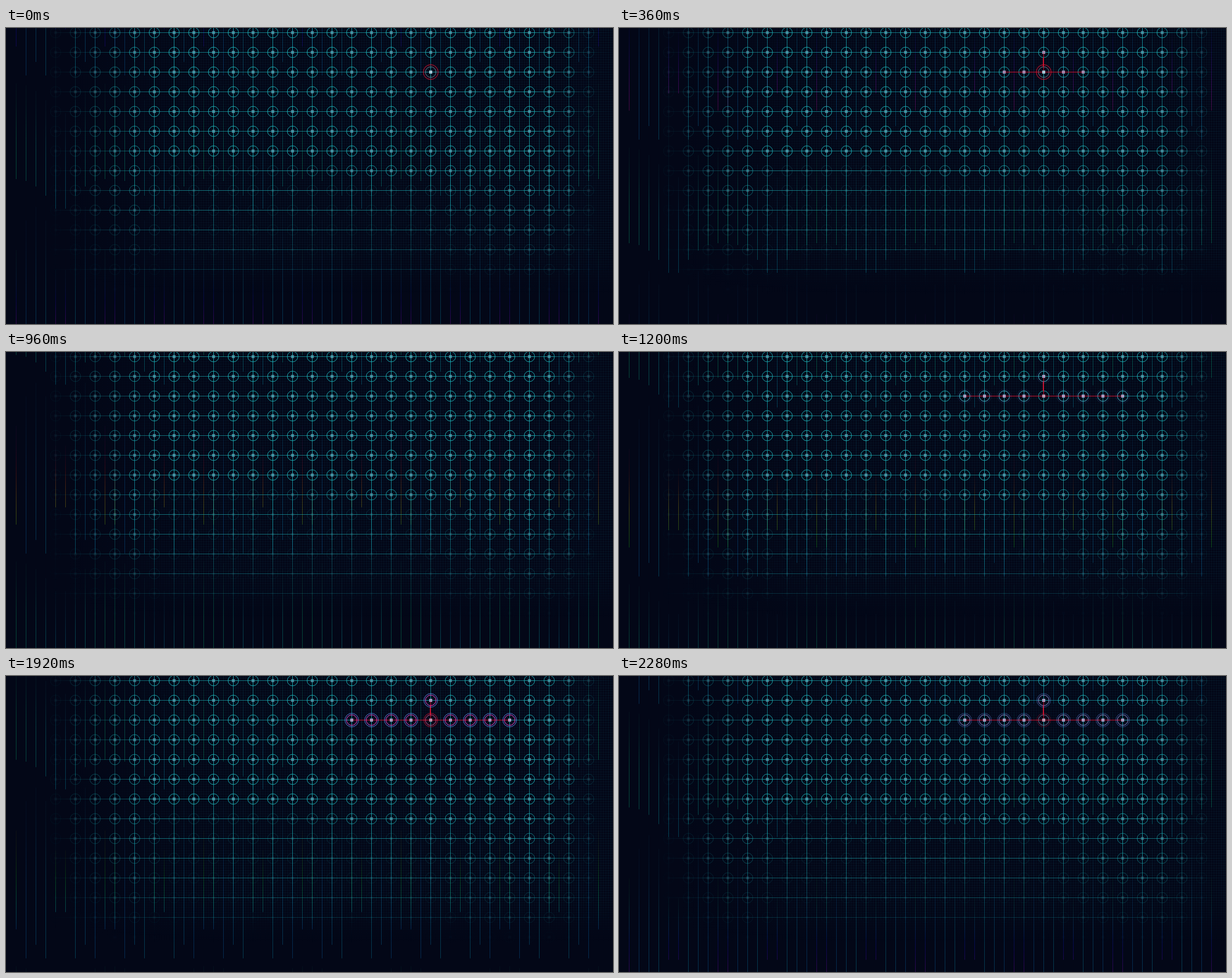
An HTML page with a canvas for the animation above (2400 ms loop, 984 px wide and 480 px high).

```html
<!DOCTYPE html>
<html lang="en">
<head>
<meta charset="utf-8">
<title>Node grid</title>
<style>
html, body { margin: 0; width: 100%; height: 100%; overflow: hidden; background: #030717; }
canvas { display: block; width: 984px; height: 480px; }
</style>
</head>
<body>
<canvas id="stage" width="984" height="480"></canvas>
<script>
const W = 984, H = 480, LOOP = 2400, STEP = 120, GAP = 32;
const HUB = { x: 688, y: 71 };
const ctx = document.getElementById('stage').getContext('2d');

const ramp = (v, a, b) => Math.max(0, Math.min(1, (v - a) / (b - a)));
const smooth = (v, a, b) => {
  const t = ramp(v, a, b);
  return t * t * (3 - 2 * t);
};
const teal = a => `rgba(32,184,190,${a})`;

// strength across the stage, fading at both sides
const side = x => smooth(x, 40, 285) * (1 - smooth(x, 860, 978));

// nodes thin out downwards, with a dim hollow left of the middle
function nodeAlpha(x, y) {
  const fall = Math.pow(1 - ramp(y, 200, 440), 1.3);
  const rise = Math.min(640, 400 + 8 * (y - 231));
  const hollow = y < 215 ? 0 : smooth(x, 205, 260) * (1 - smooth(x, rise, rise + 200));
  return side(x) * fall * (1 - .72 * hollow);
}

function ring(c, x, y, r, color) {
  c.strokeStyle = color;
  c.lineWidth = 1;
  c.beginPath();
  c.arc(x + .5, y + .5, r, 0, Math.PI * 2);
  c.stroke();
}

function square(c, x, y, color) {
  c.fillStyle = color;
  c.fillRect(x - 2, y - 2, 5, 5);
}

function layer(draw) {
  const el = document.createElement('canvas');
  el.width = W;
  el.height = H;
  draw(el.getContext('2d'));
  return el;
}

// keeps what is drawn only as far as strength(position) allows
function fade(c, x2, y2, strength) {
  const g = c.createLinearGradient(0, 0, x2, y2);
  for (let p = 0; p <= 1; p += 1 / 32)
    g.addColorStop(p, `rgba(0,0,0,${strength(p * (x2 || y2))})`);
  c.globalCompositeOperation = 'destination-in';
  c.fillStyle = g;
  c.fillRect(0, 0, W, H);
}

const mesh = layer(c => {
  c.fillStyle = 'rgba(36,120,150,.065)';
  for (let x = 0; x < W; x += 4) c.fillRect(x, 0, 1, H);
  for (let y = 3; y < H; y += 4) c.fillRect(0, y, W, 1);
  fade(c, W, 0, x => smooth(x, 80, 400));
  fade(c, 0, H, y => 1 - smooth(y, 350, 435));
});

const wires = layer(c => {
  c.fillStyle = teal(.58);
  for (let x = 80; x < W; x += GAP) c.fillRect(x, 0, 1, H);
  fade(c, W, 0, side);
  fade(c, 0, H, y => 1 - smooth(y, 250, 430));
});

const rails = layer(c => {
  for (let y = 7; y < 400; y += GAP) {
    c.fillStyle = teal(.55 * (1 - ramp(y, 230, 430) ** 2));
    c.fillRect(80, y, W - 80, 1);
  }
  fade(c, W, 0, side);
});

const nodes = layer(c => {
  for (let y = 7; y < 430; y += GAP)
    for (let x = 80; x <= 944; x += GAP) {
      c.globalAlpha = nodeAlpha(x, y);
      ring(c, x, y, 8.5, teal(.85));
      square(c, x, y, 'rgba(120,180,200,.6)');
      c.fillStyle = teal(.4);
      c.fillRect(x - 8, y, 17, 1);
      c.fillRect(x, y - 8, 1, 17);
    }
});

// rain columns repeat every 160 px, mirrored in pairs
const TRAVEL = 490, PITCH = 16, COLUMNS = 10;
const spectrum = y => 240 + 405 * Math.pow(ramp(y, 0, H), 1.3);

function dropsOf(col) {
  const m = Math.abs((col + 4) % COLUMNS - 4.5) - .5;
  const colourful = m % 4 === 0;
  return [
    { top: 90 + 3 * m * m, len: 155, hue: () => 158 + 8 * m },
    colourful
      ? { top: 360 + 8 * m, len: 160 - 15 * m, hue: spectrum }
      : { top: 290 + 22 * Math.abs(m - 2), len: 255, hue: () => 212 - 7 * m }
  ];
}
const drops = Array.from({ length: COLUMNS }, (_, col) => dropsOf(col));

function drawDrop(col, top, len, hue) {
  const g = ctx.createLinearGradient(0, top, 0, top + len);
  for (let p = 0; p <= 1; p += .125)
    g.addColorStop(p, `hsla(${hue(top + len * p) % 360},90%,40%,${.05 + .25 * smooth(p, 0, .7)})`);
  ctx.fillStyle = g;
  for (let x = col * PITCH || 160; x <= 960; x += PITCH * COLUMNS) ctx.fillRect(x, top, 1, len);
}

function rain(t) {
  const p = t / LOOP;
  const fall = TRAVEL * p + 27 * Math.sin(2 * Math.PI * p) + 42 * Math.sin(Math.PI * p) ** 2;
  drops.forEach((list, col) => list.forEach(({ top, len, hue }) => {
    for (let y = top + fall - 2 * TRAVEL; y < H; y += TRAVEL)
      if (y + len > 0) drawDrop(col, y, len, hue);
  }));
}

function targets(reach, visit) {
  visit(HUB.x, HUB.y - GAP);
  for (let i = 1; i <= reach; i++) {
    visit(HUB.x - i * GAP, HUB.y);
    visit(HUB.x + i * GAP, HUB.y);
  }
}

function links(reach) {
  ctx.fillStyle = '#c0142f';
  ctx.fillRect(HUB.x, HUB.y - GAP, 1, GAP);
  ctx.fillRect(HUB.x - 1, HUB.y - 23, 2, 15);
  ctx.fillRect(HUB.x - reach * GAP, HUB.y, 2 * reach * GAP + 1, 1);
}

function search(reach) {
  if (reach >= 0) {
    links(reach);
    targets(reach, (x, y) => square(ctx, x, y, 'rgba(175,140,180,.8)'));
  }
  ring(ctx, HUB.x, HUB.y, 12, '#d3112e');
  ring(ctx, HUB.x, HUB.y, 9, 'rgba(160,20,50,.6)');
  square(ctx, HUB.x, HUB.y, '#a5c3d2');
}

function capture(glow) {
  links(4);
  targets(4, (x, y) => {
    ring(ctx, x, y, 11, `rgba(100,135,235,${.15 + glow * .7})`);
    ring(ctx, x, y, 8.5, `rgba(${130 + 95 * glow},${150 - 125 * glow},${205 - 45 * glow},${.4 + glow * .6})`);
    square(ctx, x, y, 'rgba(176,160,200,.85)');
  });
  ring(ctx, HUB.x, HUB.y, 11, `rgba(215,20,55,${glow * .8})`);
  ring(ctx, HUB.x, HUB.y, 8.5, `rgba(220,20,80,${glow * .9})`);
  square(ctx, HUB.x, HUB.y, '#b893ab');
}

function render(t) {
  ctx.fillStyle = '#030717';
  ctx.fillRect(0, 0, W, H);
  ctx.drawImage(mesh, 0, 0);
  rain(t);
  [wires, rails, nodes].forEach(l => ctx.drawImage(l, 0, 0));
  if (t < 840) search(Math.min(4, t / STEP - 1));
  else if (t >= 1200) capture(.5 + .5 * Math.cos(Math.PI * (t - 1920) / 720));
}

const start = performance.now();
function tick() {
  const t = (performance.now() - start) % LOOP;
  render(Math.floor(t / STEP) * STEP);
  requestAnimationFrame(tick);
}
tick();
</script>
</body>
</html>
```
